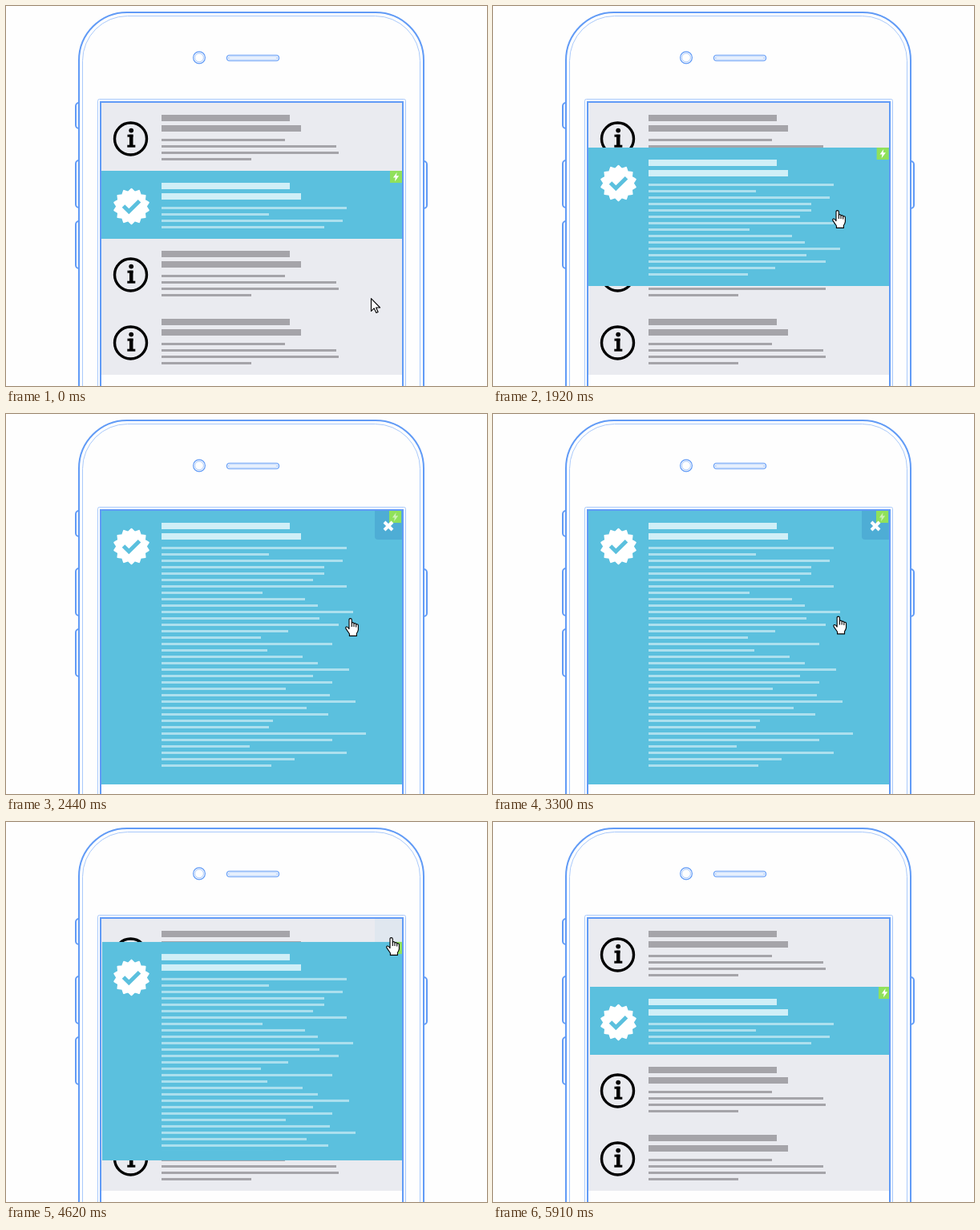
These frames come from a looping animation (600 px wide and 475 px high, 7310 ms). An HTML page with a canvas:

```html
<!DOCTYPE html>
<html lang="en">
<head>
<meta charset="utf-8">
<title>Expanding notification</title>
<style>
html, body { margin: 0; width: 100%; height: 100%; overflow: hidden; background: #fefefe; }
canvas { display: block; width: 600px; height: 475px; }
</style>
</head>
<body>
<canvas id="stage" width="600" height="475"></canvas>
<script>
const ctx = document.getElementById('stage').getContext('2d');
const LOOP = 7310;
const BLUE = '#619bf6', PALE = '#a9c9fb', CARD = '#5bc0de', GREY = '#a5a4a9';
const TEXT_X = 194;
const ROW_LINES = [154, 218, 221, 112];
const CARD_LINES = [
  231, 134, 226, 203, 203, 189, 231, 126, 179, 195, 239, 197,
  221, 158, 124, 213, 132, 176, 195, 234, 189, 213, 155, 210,
  242, 181, 208, 139, 134, 255, 213, 110, 231, 166, 137
];

const clamp = v => Math.max(0, Math.min(1, v));
const mix = (a, b, p) => a + (b - a) * p;
const smooth = p => p * p * (3 - 2 * p);

// CSS "ease": cubic-bezier(.25, .1, .25, 1)
function ease(x) {
  if (x <= 0 || x >= 1) return clamp(x);
  let lo = 0, hi = 1;
  for (let i = 0; i < 24; i++) {
    const s = (lo + hi) / 2;
    if (0.75 * s * (1 - s) + s ** 3 < x) lo = s; else hi = s;
  }
  return 0.3 * lo * (1 - lo) ** 2 + 3 * lo * lo * (1 - lo) + lo ** 3;
}

// Holds time on n even ticks between a and b
function tick(t, a, b, n) {
  if (t < a) return -1;
  const gap = (b - a) / (n - 1);
  return Math.min(b, a + Math.floor((t - a) / gap + 1e-6) * gap);
}

function box(x, y, w, h, color) {
  ctx.fillStyle = color;
  ctx.fillRect(x, y, w, h);
}

function outline(x, y, w, h, r, width, color) {
  ctx.beginPath();
  ctx.roundRect(x, y, w, h, r);
  ctx.lineWidth = width;
  ctx.strokeStyle = color;
  ctx.stroke();
}

function ring(x, y, r, width, color) {
  ctx.beginPath();
  ctx.arc(x, y, r, 0, Math.PI * 2);
  ctx.lineWidth = width;
  ctx.strokeStyle = color;
  ctx.stroke();
}

function textBars(y, widths, titleColor, lineColor) {
  box(TEXT_X, y + 15, 160, 8, titleColor);
  box(TEXT_X, y + 28, 174, 8, titleColor);
  widths.forEach((w, i) => box(TEXT_X, y + 45 + i * 8, w, 3, lineColor));
}

function infoIcon(y) {
  ring(155.5, y + 45, 20, 3.4, '#000');
  ctx.beginPath();
  ctx.arc(156.2, y + 34.6, 2.9, 0, Math.PI * 2);
  ctx.fillStyle = '#000';
  ctx.fill();
  box(151.5, y + 39.7, 7, 3, '#000');
  box(154, y + 39.7, 4.5, 15, '#000');
  box(151.3, y + 52.7, 10, 3, '#000');
}

function sealIcon(y) {
  const cx = 156.5, cy = y + 44.5, points = 14;
  ctx.beginPath();
  for (let i = 0; i < points * 2; i++) {
    const a = i * Math.PI / points - Math.PI / 2;
    const r = i % 2 ? 18.2 : 21.8;
    ctx.lineTo(cx + r * Math.cos(a), cy + r * Math.sin(a));
  }
  ctx.closePath();
  ctx.fillStyle = ctx.strokeStyle = '#fff';
  ctx.lineJoin = 'round';
  ctx.lineWidth = 2;
  ctx.fill();
  ctx.stroke();
  ctx.beginPath();
  ctx.moveTo(146.5, cy - 0.5);
  ctx.lineTo(153.3, cy + 6.3);
  ctx.lineTo(166.5, cy - 6.7);
  ctx.lineJoin = 'miter';
  ctx.lineWidth = 5;
  ctx.strokeStyle = CARD;
  ctx.stroke();
}

function boltTag(x, y, glow) {
  box(x, y, 15, 15, '#90e15b');
  ctx.beginPath();
  [[8.6, 2], [3.9, 8.4], [6.8, 8.4], [6, 13.2], [11.2, 6.3], [8, 6.3]]
    .forEach(([px, py]) => ctx.lineTo(x + px, y + py));
  ctx.closePath();
  ctx.fillStyle = `rgba(255,255,255,${glow})`;
  ctx.fill();
}

function closeButton(alpha) {
  ctx.save();
  ctx.globalAlpha = alpha;
  ctx.beginPath();
  ctx.roundRect(460, 121, 34, 36, [0, 0, 0, 4]);
  ctx.fillStyle = '#4eadd5';
  ctx.fill();
  ctx.restore();
}

function closeCross(alpha) {
  ctx.save();
  ctx.globalAlpha = alpha;
  ctx.beginPath();
  ctx.moveTo(472, 135);
  ctx.lineTo(482, 145);
  ctx.moveTo(482, 135);
  ctx.lineTo(472, 145);
  ctx.lineWidth = 4;
  ctx.strokeStyle = '#fff';
  ctx.stroke();
  ctx.restore();
}

function phone() {
  outline(87, 121, 8, 32, 4, 2, BLUE);
  outline(87, 193, 8, 59, 4, 2, BLUE);
  outline(87, 269, 8, 59, 4, 2, BLUE);
  outline(517, 194, 8, 59, 4, 2, BLUE);
  ctx.beginPath();
  ctx.roundRect(91, 8, 430, 560, 60);
  ctx.fillStyle = '#fefefe';
  ctx.fill();
  outline(91, 8, 430, 560, 60, 2, BLUE);
  outline(95.5, 12.5, 421, 560, 56, 1, PALE);
  ring(241, 64.5, 7.4, 1.2, BLUE);
  ring(241, 64.5, 5.4, 1, PALE);
  outline(275.5, 61.5, 65, 7, 3.5, 1.2, BLUE);
  outline(277.5, 63.5, 61, 3, 1.5, 1, PALE);
  outline(114.5, 116.5, 384, 400, 2, 1, PALE);
}

// Card geometry and close button opacity at time t
function cardState(t) {
  const closed = { top: 206, h: 85, left: 119, tagX: 479, pad: 8, fade: 0 };
  if (t < 1920) return closed;
  if (t < 4620) {
    const s = t < 2010 ? 1920 : tick(t, 2010, 2440, 9);
    const p = ease((s - 1842) / 355);
    const top = Math.round(mix(206, 121, p));
    return {
      top, h: Math.round(mix(291, 463, p)) - top, left: 119,
      tagX: mix(479, 478, p), pad: 8, fade: clamp((s - 2150) / 290)
    };
  }
  const s = tick(t, 4620, 4890, 7);
  const done = s >= 4890;
  const p = done ? 1 : ease((s - 4542) / 355);
  const q = done ? 1 : ease((s - 4550) / 372);
  const left = Math.round(119 + 2 * p);
  return {
    top: mix(121, 206, p), h: mix(342, 85, q), left,
    tagX: left + 360, pad: 8 + 6 * (1 - q), fade: s < 4660 ? 0.06 : 0
  };
}

function card(t) {
  const { top, h, left, tagX, pad, fade } = cardState(t);
  ctx.save();
  ctx.beginPath();
  ctx.rect(119, 121, 375, 354);
  ctx.clip();
  const shrinking = t >= 4620;
  if (shrinking) closeButton(fade);
  box(left, top, 375, h, CARD);
  sealIcon(top);
  ctx.save();
  ctx.beginPath();
  ctx.rect(119, top, 375, h - pad);
  ctx.clip();
  textBars(top, CARD_LINES, '#d0eff7', '#ade0ee');
  ctx.restore();
  if (!shrinking) closeButton(fade);
  boltTag(tagX, top, shrinking ? 1 : 1 - 0.45 * fade);
  if (!shrinking) closeCross(fade);
  ctx.restore();
}

function screen(t) {
  box(119, 121, 375, 340, '#eaebf0');
  for (const y of [121, 291, 376]) {
    infoIcon(y);
    textBars(y, ROW_LINES, GREY, GREY);
  }
  card(t);
  outline(118, 120, 377, 400, 0, 2, BLUE);
}

const ARROW = new Path2D('M.5 .6V16.4L4.2 12.9 6.9 18.4 9.1 17.4 6.6 12H11.6Z');
const HAND = new Path2D(
  'M5 13.6V2.2Q5 .6 6.6 .6T8.3 2.2V6Q10.6 5 11 6.9 13.3 6 13.7 7.9 16.4 7.2 16.4 9.6' +
  'V14.6Q16.2 16.6 14.4 19.2V22.4H5.4V19.8L1 13.4Q.2 11.6 1.6 11 3.2 10.6 5 13.6Z');
const KNUCKLES = new Path2D('M8.3 6V11M11 6.9V11M13.7 7.9V11.5');

function pointer(shape, x, y, alpha = 1) {
  ctx.save();
  ctx.globalAlpha = alpha;
  ctx.translate(x, y);
  ctx.lineJoin = 'round';
  ctx.lineWidth = 1.1;
  ctx.strokeStyle = '#000';
  ctx.fillStyle = '#fff';
  ctx.fill(shape);
  ctx.stroke(shape);
  if (shape === HAND) ctx.stroke(KNUCKLES);
  ctx.restore();
}

function cursor(t) {
  if (t < 1300) {
    const p = smooth(clamp((tick(t, 560, 1250, 12) - 500) / 750));
    pointer(ARROW, mix(455, 423, p), mix(365, 257, p));
  } else if (t < 5590) {
    const p = smooth(clamp((tick(t, 3250, 3810, 11) - 3195) / 615));
    pointer(HAND, mix(423, 474, p), mix(255, 144, p));
  } else if (t < 5910) {
    const p = clamp((tick(t, 5590, 5910, 7) - 5540) / 370);
    pointer(HAND, mix(474, 559, smooth(p)), mix(144, 215, smooth(p)), 1 - p);
  }
}

function draw() {
  const t = performance.now() % LOOP;
  box(0, 0, 600, 475, '#fefefe');
  phone();
  screen(t);
  cursor(t);
  requestAnimationFrame(draw);
}
draw();
</script>
</body>
</html>
```
